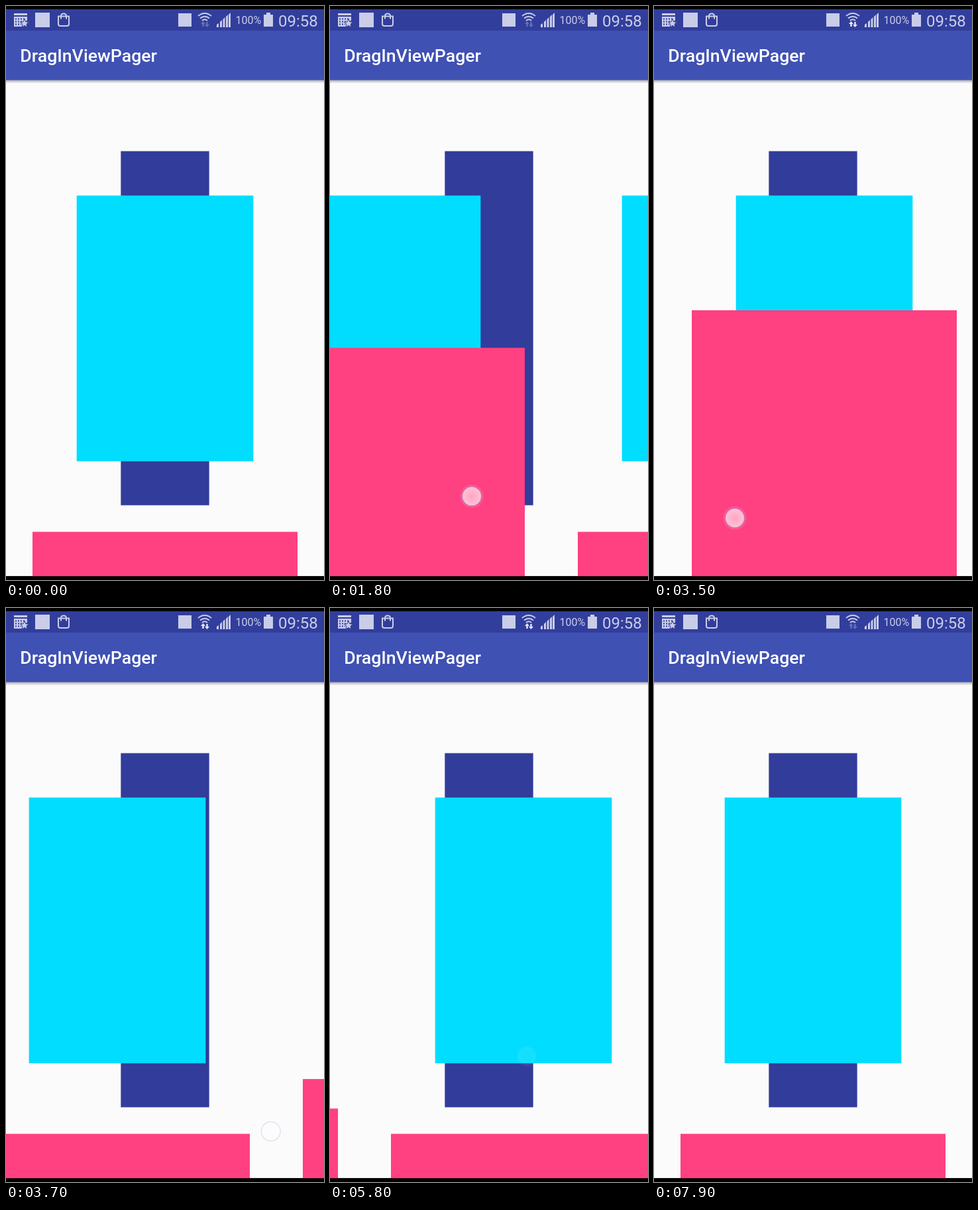
Write an HTML page that moves like this. It is 480 px wide and 864 px high and loops after 8 s.

```html
<!DOCTYPE html>
<html lang="en">
<head>
<meta charset="utf-8">
<title>DragInViewPager</title>
<style>
  html, body { margin: 0; width: 100%; height: 100%; overflow: hidden; background: #000; }
  svg { display: block; width: 100%; height: 100%; }
  text { font-family: Roboto, sans-serif; }
  .icon { fill: #c9cde8; }
  .line { fill: none; stroke: #c9cde8; stroke-width: 2; }
  .card { fill: #00ddff; }
  .sheet { fill: #ff4081; }
</style>
</head>
<body>
<svg viewBox="0 0 480 864">
  <defs>
    <linearGradient id="shade" x2="0" y2="1">
      <stop offset="0" stop-color="#000" stop-opacity=".3"/>
      <stop offset="1" stop-color="#000" stop-opacity="0"/>
    </linearGradient>
    <radialGradient id="glow">
      <stop offset="0" stop-color="#fff" stop-opacity=".45"/>
      <stop offset="1" stop-color="#fff" stop-opacity=".64"/>
    </radialGradient>
  </defs>

  <rect y="5.300" width="480" height="853" fill="#fbfbfb"/>
  <rect x="173.330" y="218.500" width="133.330" height="533" fill="#313c9b"/>
  <g class="page">
    <rect class="card" x="106.670" y="285.300" width="266.670" height="400"/>
    <rect class="sheet" x="40" width="400" height="746"/>
  </g>
  <g class="page">
    <rect class="card" x="106.670" y="285.300" width="266.670" height="400"/>
    <rect class="sheet" x="40" width="400" height="746"/>
  </g>

  <g id="touch">
    <circle r="17.5" fill="#fff" fill-opacity=".13"/>
    <circle r="14.5" fill="url(#glow)" stroke="#5560c0" stroke-opacity=".3" stroke-width="1.6"/>
  </g>

  <rect y="111.700" width="480" height="5" fill="url(#shade)"/>
  <rect y="37" width="480" height="74.700" fill="#3f51b3"/>
  <rect y="5.300" width="480" height="31.700" fill="#323e9c"/>
  <text x="21.330" y="84.200" font-size="26.670" font-weight="500" fill="#fff">DragInViewPager</text>

  <!-- calendar, app badge, bag -->
  <path class="icon" d="M12 11h20v3H12zM12 16h20v6l-4 1-3 8H12z"/>
  <path d="M14 19.500h16M14 23.500h11M14 27.500h9" stroke="#323e9c" stroke-width="2" stroke-dasharray="2 2"/>
  <path class="icon" stroke="#323e9c" d="M28 19.500l1.900 4.300 4.600.4-3.500 3.100 1 4.600-4-2.400-4 2.400 1-4.600-3.500-3.100 4.600-.4z"/>
  <rect class="icon" x="44" y="10" width="22" height="22"/>
  <path class="line" d="M79 15.500h16V27q0 3-3 3H82q-3 0-3-3zM83 19.500V15q0-3.500 4-3.500t4 3.500v4.500"/>

  <!-- connection, wifi, signal, battery -->
  <rect class="icon" x="260" y="11" width="20" height="20"/>
  <path class="line" stroke-width="2.500" d="M290 15q10-8 20 0M293 18.500q7-5.500 14 0M296 22q4-3.500 8 0"/>
  <path id="arrows" d="M297.500 23l3.500 4h-2.300v4h-2.400v-4H294zM303.500 32l-3.500-4h2.300v-4h2.400v4h2.300z"/>
  <path class="icon" d="M318 28l3-2v6h-3zM323 24l3-3v11h-3zM327.500 20l3-3v15h-3zM332 16l3-3v19h-3zM336 13l3-3v22h-3z"/>
  <text class="icon" x="346.500" y="27" font-size="16">100%</text>
  <path class="icon" d="M389 13h4v-3h6v3h4v18h-14z"/>
  <text class="icon" x="411" y="30.500" font-size="24">09:58</text>

  <path d="M0 0h480v5.300H0zM0 858.300h480V864H0z"/>
</svg>
<script>
const LOOP = 8000, STEP = 100, PAGE = 480, CLOSED = 791.5, OPEN = 458, TAU = 65;

// Moments at which each part starts towards its other state.
const scrollTimes = [1728, 3481, 5554];
const sheetTimes = [[560, 1752, 4449, 5558], [2598, 3524]];
const busyTimes = [2600, 3900, 4500, 6800];

const strokes = [
  { start: 560, from: [340, 808], to: [325, 440] },
  { start: 1728, from: [300, 742], to: [17, 729] },
  { start: 2598, from: [322, 834], to: [339, 378] },
  { start: 3481, from: [110, 770], to: [451, 791] },
  { start: 4449, from: [352, 835], to: [378, 434] },
  { start: 5554, from: [430, 702], to: [281, 671] },
  { start: 6590, from: [436, 757], to: [254, 735] },
  { start: 7490, from: [359, 756], to: [105, 721] }
];

const mix = (a, b, p) => a + (b - a) * p;
const clamp = v => Math.min(1, Math.max(0, v));

// Critically damped approach from 0 to 1.
function settle(elapsed) {
  const k = Math.max(0, elapsed) / TAU;
  return 1 - (1 + k) * Math.exp(-k);
}

// Alternates between 0 and 1 at the given times.
const toggle = (times, t, ease) =>
  times.reduce((sum, start, i) => sum + (i % 2 ? -1 : 1) * ease(t - start), 0);

const pages = document.querySelectorAll('.page');
const sheets = document.querySelectorAll('.sheet');
const touch = document.getElementById('touch');
const arrows = document.getElementById('arrows');
const move = (el, x, y) => el.setAttribute('transform', `translate(${x} ${y})`);

function drawTouch(t) {
  const stroke = strokes.find(s => t >= s.start - STEP && t < s.start + 4 * TAU);
  touch.setAttribute('opacity', stroke ? clamp((stroke.start + 255 - t) / 75) : 0);
  if (!stroke) return;
  const p = settle(t - stroke.start);
  move(touch, ...stroke.from.map((v, i) => mix(v, stroke.to[i], p)));
}

function draw(t) {
  const scroll = Math.round(PAGE * toggle(scrollTimes, t, settle));
  pages.forEach((page, i) => {
    move(page, i * PAGE - scroll, 0);
    sheets[i].setAttribute('y', mix(CLOSED, OPEN, toggle(sheetTimes[i], t, settle)));
  });
  drawTouch(t);
  const busy = toggle(busyTimes, t, elapsed => elapsed >= 0);
  arrows.setAttribute('fill', busy ? '#e8eaf6' : '#6771b8');
}

const origin = performance.now();
function frame() {
  const t = (performance.now() - origin) % LOOP;
  draw(Math.floor(t / STEP) * STEP);
  requestAnimationFrame(frame);
}
frame();
</script>
</body>
</html>
```
